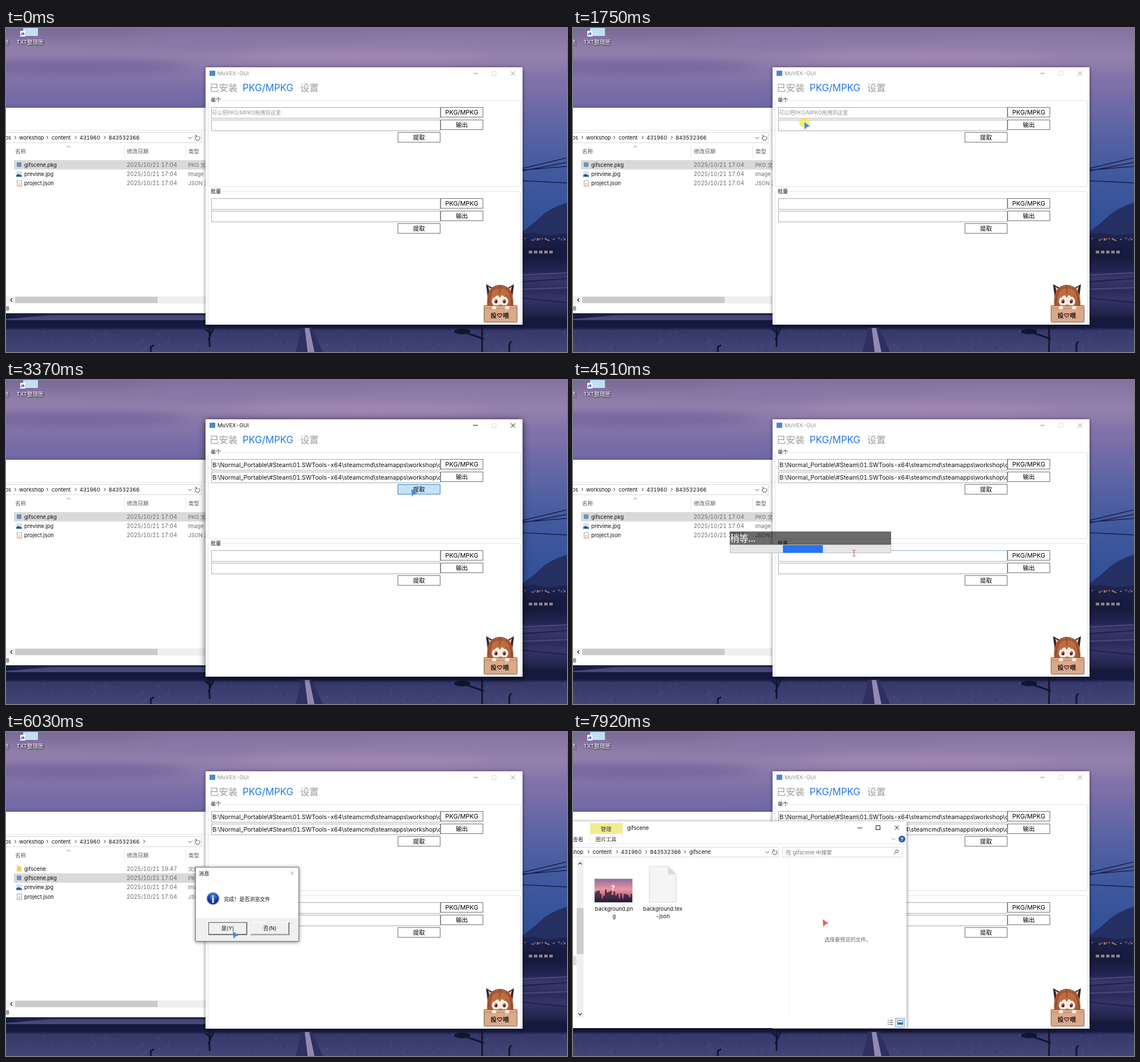
Recreate the animation shown at these times as an HTML page. Size 984x569 px, loop 7990 ms.

```html
<!DOCTYPE html>
<html lang="zh-CN">
<head>
<meta charset="utf-8">
<title>Unpack demo</title>
<style>
html, body { margin: 0; width: 100%; height: 100%; overflow: hidden; background: #1b2048; }
svg { display: block; }
text { font-family: Inter, "Noto Sans CJK SC", "Noto Sans CJK", sans-serif; white-space: pre; font-feature-settings: "tnum"; }
.shadow { filter: drop-shadow(0 1px 3px #0008); }
.line { fill: none; stroke: #444; }
</style>
</head>
<body>
<svg id="stage" width="984" height="569" viewBox="0 0 984 569">
  <defs>
    <linearGradient id="sky" x2="0" y2="1">
      <stop stop-color="#8170a0"/><stop offset=".13" stop-color="#9581ad"/><stop offset=".3" stop-color="#796da8"/>
      <stop offset=".5" stop-color="#5863a3"/><stop offset=".68" stop-color="#42599f"/><stop offset="1" stop-color="#2d4e95"/>
    </linearGradient>
    <linearGradient id="land" x2="0" y2="1">
      <stop stop-color="#1a1f48"/><stop offset=".16" stop-color="#161a3e"/><stop offset=".28" stop-color="#22254f"/>
      <stop offset=".35" stop-color="#39396b"/><stop offset=".46" stop-color="#2a2b5b"/><stop offset=".53" stop-color="#353566"/>
      <stop offset=".65" stop-color="#23264f"/><stop offset=".71" stop-color="#141a3d"/><stop offset=".785" stop-color="#151b40"/>
      <stop offset=".81" stop-color="#363869"/><stop offset="1" stop-color="#434577"/>
    </linearGradient>
    <linearGradient id="dusk" x2="0" y2="1">
      <stop stop-color="#8d6fa3"/><stop offset=".45" stop-color="#ee93a0"/><stop offset=".7" stop-color="#c66f88"/><stop offset="1" stop-color="#221c38"/>
    </linearGradient>
    <radialGradient id="info" cy=".3"><stop stop-color="#4f8df0"/><stop offset="1" stop-color="#0b2f9e"/></radialGradient>
    <filter id="soft" x="-50%" y="-100%" width="200%" height="300%"><feGaussianBlur stdDeviation="24 8"/></filter>
    <clipPath id="field"><rect x="361" y="139" width="400" height="42"/></clipPath>
  </defs>
</svg>
<script>
const LOOP = 7990, RED = [250, 82, 88], BLUE = [70, 135, 245];
const PATH = 'B:\\Normal_Portable\\#Steam\\01.SWTools-x64\\steamcmd\\steamapps\\workshop\\content\\431960\\843532366';
let seed = 7;
const rnd = () => (seed = seed * 16807 % 2147483647) / 2147483647;
const many = (n, f) => Array.from({ length: n }, (_, i) => f(i)).join('');

const text = (x, y, s, size = 9.4, fill = '#111', more = '') =>
  `<text x="${x}" y="${y}" font-size="${size}" fill="${fill}" ${more}>${s}</text>`;
const mid = 'text-anchor="middle"';
const rect = (x, y, w, h, fill, stroke, more = '') => stroke
  ? `<rect x="${x + .5}" y="${y + .5}" width="${w - 1}" height="${h - 1}" fill="${fill}" stroke="${stroke}" ${more}/>`
  : `<rect x="${x}" y="${y}" width="${w}" height="${h}" fill="${fill}" ${more}/>`;
const line = (d, stroke = '#444', w = 1, more = '') =>
  `<path d="${d}" class="line" style="stroke:${stroke};stroke-width:${w}" ${more}/>`;
const shape = (d, fill) => `<path d="${d}" fill="${fill}"/>`;
const group = (id, body, more = '') => `<g id="${id}" ${more}>${body}</g>`;
const oval = (x, y, rx, ry, fill) => `<ellipse cx="${x}" cy="${y}" rx="${rx}" ry="${ry}" fill="${fill}"/>`;

function wallpaper() {
  const clouds = [[110, 68, 210, 14, '#6d5f96'], [120, 122, 200, 14, '#786ba5'], [300, 30, 160, 11, '#8777a5'],
    [620, 50, 230, 10, '#a68bb0'], [810, 18, 190, 12, '#8d7ba8'], [960, 100, 80, 14, '#7f71a8'], [80, 6, 180, 8, '#74668f']];
  return rect(0, 0, 984, 372, 'url(#sky)')
    + `<g filter="url(#soft)" opacity=".7">${clouds.map(c => oval(...c)).join('')}</g>`
    + shape('M900 362 Q925 344 945 325 Q965 312 984 307 V374 H900Z', '#252f62')
    + shape('M900 364 L925 359 950 364 984 361 V376 H900Z', '#1c2450')
    + line('M900 248 L984 228 M900 252 L984 236 M900 250 L984 243 M900 268 L984 272', '#191f49', 1.3)
    + rect(0, 370, 984, 199, 'url(#land)')
    + many(26, () => rect(905 + rnd() * 79, 368 + rnd() * 5, 1 + rnd() * 2, 1.2, '#d39a72'))
    + rect(900, 387, 65, 15, '#151a3b') + many(5, i => rect(917 + i * 9, 391, 6, 5, '#8d8185'))
    + line('M900 434 L984 430 M900 459 L984 456', '#4b4a7d', 2) + line('M900 446 L984 440 M900 474 L984 482', '#1f234d', 2.5)
    + shape('M0 511 L90 503 H350 V513 H0Z', '#4a477c') + shape('M0 505 L60 502 H350 V504 H100Z', '#2b2d5e')
    + many(190, () => { const x = rnd() * 984, y = 530 + rnd() * 39; return line(`M${x} ${y} v${2 + rnd() * 3}`, rnd() < .5 ? '#50527f' : '#2d305f', 1); })
    + shape('M508 569 L518 526 H536 L556 569Z', '#2d3060') + shape('M524 527 H532 L541 569 H529Z', '#9489b4')
    + line('M357 522 V560 M349 528 L360 538 M364 526 L355 548 M254 569 v-9 l6 -3 M883 569 v-14 l3 -5 M835 524 V569', '#12142f', 3)
    + oval(800, 533, 14, 5, '#12142f') + line('M806 535 L838 546', '#12142f', 3)
    + rect(30, -8, 26, 22, '#bfe0f3') + rect(25, 5, 9, 10, '#fff') + line('M27 13 v-3 h4 M29 7.5 l3 2.5 -3 2.5', '#246bc0', 1.3)
    + `<g style="filter:drop-shadow(1px 1px 1px #000)">${text(18.5, 27.5, 'TXT整理匣', 9.6, '#fff')}${text(-5, 27.5, '络', 9.6, '#fff')}</g>`;
}

const icons = {
  pkg: y => rect(19, y - 4, 8, 8, '#6f8fb5'),
  jpg: y => rect(18, y - 5, 10, 10, '#cfe4f5') + shape(`M18 ${y + 5} v-3 l4 -2 6 3 v2z`, '#24599b'),
  json: y => rect(19, y - 5, 9, 11, '#fff', '#b99c88') + text(23.5, y + 3, '{}', 6, '#b06a30', mid),
  dir: y => shape(`M19 ${y - 5} h3 l1 1 h4 v9 h-8z`, '#f7cf68')
};
const FILES = {
  pkg: ['gifscene.pkg', '17:04', 'PKG 文件'], jpg: ['preview.jpg', '17:04', 'Image'],
  json: ['project.json', '17:04', 'JSON 源文件'], dir: ['gifscene', '19:47', '文件夹']
};
const fileList = (id, order) => group(id, order.map((key, i) => {
  const y = 240 + i * 16.3, [name, time, type] = FILES[key];
  return (key == 'pkg' ? rect(14, y - 8, 340, 16.5, '#d9d9d9', '', 'class="pick"') : '') + icons[key](y)
    + text(32, y + 3.6, name, 9.4) + text(211.5, y + 3.6, '2025/10/21 ' + time, 9.8, '#6d6d6d') + text(319.5, y + 3.6, type, 9.4, '#6d6d6d');
}).join(''));

const crumbs = (y, items) => items.map(([x, s]) => text(x, y, s, s == '›' ? 12 : 9.3, s == '›' ? '#555' : '#111')).join('');
const refresh = (x, y) => line(`M${x + 2} ${y - 3} A4 4 0 1 1 ${x - 2} ${y - 3} M${x - 4} ${y - 4} h3 v3`);
const chevron = (x, y, c) => line(`M${x - 3} ${y - 1.5} l3 3 3 -3`, c);

function explorer() {
  return rect(-9, 140, 370, 361, '#fff', '', 'class="shadow"') + rect(0, 179, 350, 1, '#e6e6e6')
    + rect(-5, 183, 348, 19, '#fff', '#d9d9d9') + line('M331 184 v17', '#e2e2e2')
    + crumbs(195.6, [[-1.5, 'os'], [14, '›'], [23, 'workshop'], [70, '›'], [80, 'content'], [120, '›'], [129, '431960'], [171, '›'], [180, '843532366']])
    + chevron(323, 193) + refresh(336, 193)
    + text(16, 220.4, '名称', 9.5, '#555') + text(212, 220.4, '修改日期', 9.5, '#555') + text(320, 220.4, '类型', 9.5, '#555')
    + line('M106.5 210 l3 -3 3 3', '#777') + line('M207.5 206 v22 M315.5 206 v22', '#e5e5e5')
    + fileList('before', ['pkg', 'jpg', 'json']) + fileList('added', ['pkg', 'jpg', 'json', 'dir']) + fileList('sorted', ['dir', 'pkg', 'jpg', 'json'])
    + group('tail', text(240, 195.6, '›', 12, '#555'))
    + rect(0, 471, 350, 13, '#f0f0f0') + rect(16, 472, 250, 11, '#cbcbcb') + line('M11 474.5 l-3 3 3 3', '#333', 1.3)
    + text(-2, 495.5, 'IB', 8.6);
}

const button = (x, y, s, size = 10.4, id = '') => rect(x, y, 75, 18, '#fff', '#707070', id && `id="${id}"`) + text(x + 37.5, y + 13, s, size, '#000', mid);
const field = (y, id) => rect(360, y, 402, 20, '#fff', '#a9a9a9', `id="${id}"`);

function mascot() {
  return shape('M845 474 L842 450 L857 458 H877 L891 450 L888 474Z', '#33272a')
    + shape('M848 463 l-2 -9 8 6z M885 463 l2 -9 -8 6z', '#efc4b8')
    + shape('M844 491 Q841 452 866 451 Q892 452 890 491Z', '#a95c35')
    + oval(866.5, 480, 14.5, 11, '#fdeadd')
    + shape('M850 480 Q849 457 867 458 Q885 457 884 480 Q882 472 878 468 L875 473 870 468 866 474 862 468 857 473 Q851 473 850 480Z', '#bd6d42')
    + line('M847 489 Q845 465 858 456 M887 489 Q888 465 876 456 M866 452 V467', '#7d3d22')
    + oval(859.5, 480, 2.6, 3.6, '#4a2019') + oval(874, 480, 2.6, 3.6, '#4a2019') + oval(859, 478.5, 1, 1, '#fff') + oval(873.5, 478.5, 1, 1, '#fff')
    + line('M864.5 486 q2.5 2 5 0', '#8d443b')
    + rect(838, 487, 59, 30, '#d9a98a', '#8b5a46', 'rx="1"') + line('M838 492.5 h59', '#b98465')
    + oval(856, 491, 4, 3, '#fdeadd') + oval(879, 491, 4, 3, '#fdeadd')
    + text(866, 509, '投♡喂', 10.6, '#241712', mid + ' font-weight="600"');
}

function tool() {
  const frame = (y, h, s) => rect(354, y, 549, h, 'none', '#e3e3e3', 'rx="2"') + rect(357, y - 4, 22, 10, '#fff') + text(359, y + 2.8, s, 9);
  return rect(350, 69, 556, 452, '#fff', '', 'id="frame" class="shadow"')
    + rect(357, 75, 10, 9, '#4a86d8')
    + group('title', text(371, 83.3, 'MuVEX-GUI', 9.4, 'inherit') + line('M819.5 79.5 h8 M885.5 76 l7.5 7.5 M893 76 l-7.5 7.5', 'currentColor'))
    + rect(852, 76, 8, 8, 'none', '#dedede')
    + text(357, 111, '已安装', 16.4, '#9b9b9b') + text(415, 111, 'PKG/MPKG', 16.8, '#2277e6') + text(516, 111, '设置', 16.3, '#9b9b9b')
    + frame(127, 152, '单个') + frame(287, 232, '批量')
    + field(139) + field(161) + field(299, 'batch') + field(321)
    + group('hint', text(361, 152, '可以把PKG/MPKG拖拽到这里', 9.1, '#949494'))
    + group('paths', `<g clip-path="url(#field)">${text(362, 152.5, PATH + '\\gifscene.pkg', 10.5)}${text(362, 174.5, PATH + '\\gifscene', 10.5)}</g>`)
    + button(762, 139, 'PKG/MPKG', 10.9) + button(762, 161, '输出') + button(687, 183, '提取', 10.4, 'extract')
    + button(762, 299, 'PKG/MPKG', 10.9) + button(762, 321, '输出') + button(687, 343, '提取') + mascot();
}

const popup = () => rect(275, 266, 283, 24, '#000', '', 'opacity=".58"') + text(275.5, 284, '稍等...', 16, '#fff', 'font-weight="500"')
  + rect(275, 289, 283, 15, '#e6e6e6', '#bcbcbc') + rect(0, 290, 70, 13.5, '#2874f0', '', 'id="bar"');

function dialog() {
  const choice = (x, s) => rect(x, 334, 68, 22, '#f0f0f0') + line(`M${x} 334.5 h67`, '#fff')
    + line(`M${x} 356 h67.5 V334`, '#606060', 1.2) + line(`M${x + 1} 355 h65.5 V335`, '#a5a5a5') + text(x + 34, 348.3, s, 9.2, '#111', mid);
  return rect(332, 237, 182, 131, '#fff', '#777', 'class="shadow"') + rect(333, 327, 180, 40, '#f0f0f0')
    + text(338, 251.5, '消息', 9.3) + line('M499 245 l6 6 M505 245 l-6 6', '#aaa')
    + '<circle cx="363" cy="292.5" r="10.7" fill="url(#info)" stroke="#a9adb8" stroke-width="1.3"/>'
    + text(363, 299.5, 'i', 18, '#fff', mid + ' font-weight="700" style="font-family:\'Liberation Serif\',serif"')
    + text(382, 296.7, '完成！是否浏览文件', 9.05)
    + choice(355, '是(Y)') + choice(429, '否(N)') + rect(355, 334, 68, 22, 'none', '#555');
}

function results() {
  const skyline = many(22, i => { const h = 6 + rnd() * 17; return rect(38 + i * 3, 299 - h, 3, h, '#241d36', '', 'opacity=".75"'); });
  return rect(-9, 157, 594, 363, '#fff', '', 'class="shadow"')
    + rect(30, 160, 57, 19, '#f1ec8d') + line('M30 179 v16 M87 179 v16 M0 196.5 h585', '#e8e8e8')
    + text(58, 173.5, '管理', 9.3, '#333', mid) + text(58, 191.5, '图片工具', 9.1, '#333', mid) + text(0, 191.5, '查看', 9.1, '#333')
    + text(95, 171.7, 'gifscene', 9.4) + line('M499 168.5 h8 M564.5 164.5 l7 7 M571.5 164.5 l-7 7', '#222') + rect(531, 164, 8, 8, 'none', '#222')
    + chevron(562, 188, '#888') + oval(577, 188, 6, 6, '#315f9e') + text(577, 191.5, '?', 9, '#fff', mid + ' font-weight="700"')
    + rect(-5, 202, 366, 18, '#fff', '#d9d9d9') + rect(367, 202, 211, 18, '#fff', '#d9d9d9')
    + crumbs(214, [[-3.5, 'shop'], [25, '›'], [34.5, 'content'], [75, '›'], [84, '431960'], [126, '›'], [135, '843532366'], [194, '›'], [204, 'gifscene']])
    + chevron(341, 211) + refresh(354, 211) + text(373.5, 214.5, '在 gifscene 中搜索', 9.4, '#777')
    + '<circle cx="568" cy="209.5" r="2.5" class="line"/>' + line('M566 211.5 l-3.5 3.5')
    + rect(6.5, 224, 12, 278, '#f0f0f0') + rect(6.5, 309, 12, 81, '#cdcdcd') + rect(0, 393, 6, 17, '#dedede')
    + line('M9.5 232.5 l3 -3 3 3 M9.5 494 l3 3 3 -3', '#333', 1.3) + line('M378.5 224 V502', '#f3f3f3')
    + rect(37, 257, 68, 43, '#e0e0e0') + rect(38, 258, 66, 41, 'url(#dusk)') + skyline + text(70, 278, '?', 12, '#fff', mid + ' font-weight="700"')
    + shape('M134 236 h33 l14 14 v49 h-47z', '#f5f5f5') + line('M134 236 h33 l14 14 v48.5 h-47z', '#d4d4d4') + shape('M167 236 v14 h14z', '#d9d9d9')
    + text(72, 313.5, 'background.pn', 9.4, '#111', mid) + text(72, 326.5, 'g', 9.4, '#111', mid)
    + text(157.5, 313.5, 'background.tex', 9.4, '#111', mid) + text(157.5, 326.5, '-json', 9.4, '#111', mid)
    + text(441, 367.5, '选择要预览的文件。', 9.1, '#666')
    + line('M552 506.5 h2 M552 510 h2 M552 513.5 h2 M555.5 506.5 h6 M555.5 510 h6 M555.5 513.5 h6', '#777', 1.5)
    + rect(565, 502, 17, 17, '#cde8fb', '#75b8e6') + rect(569, 506, 10, 8, '#fff', '#777') + rect(570, 510, 8, 3, '#2e6f94');
}

const drag = () => rect(-48, -65, 79, 78, '#cfe8f4', '#b5d6e6', 'opacity=".6"') + rect(-30, -46, 40, 40, '#2f9fe8', '', 'rx="3"');
const pointer = () => group('halo', oval(0, 1, 9, 9, '#f1e94a'), 'opacity=".75"')
  + '<path id="arrow" d="M0 0 L10 7 4.5 9 1 13.5Z"/>'
  + group('beam', line('M-2 -5 h5 M-2 5 h5 M.5 -5 v10', '#d9464c'));

const stage = document.getElementById('stage');
stage.insertAdjacentHTML('beforeend', wallpaper() + explorer() + tool() + group('popup', popup()) + group('dialog', dialog())
  + group('results', results()) + group('drag', drag()) + group('pointer', pointer()));

const el = id => document.getElementById(id);
const show = (id, on) => el(id).style.display = on ? '' : 'none';
const ramp = (t, a, b) => Math.max(0, Math.min(1, (t - a) / (b - a)));
const between = (t, a, b) => t >= a && t < b;

// time, x, y of the pointer tip
const KEYS = [[130, 584, 473], [500, 380, 345], [880, 185, 243], [1140, 200, 244], [1280, 247, 234], [1480, 325, 203], [1890, 447, 146],
  [2380, 447, 146], [2570, 616.5, 214], [2890, 711, 191.5], [3480, 711, 191.5], [3900, 545, 292], [4150, 492.5, 304],
  [5370, 492.5, 304], [5640, 398, 350], [6650, 398, 350], [7000, 532, 352], [7840, 532, 352], [7920, 438, 329]];
function place(t) {
  const i = KEYS.findIndex(k => k[0] > t);
  if (i < 0) return KEYS[KEYS.length - 1].slice(1);
  if (!i) return KEYS[0].slice(1);
  const [a, x, y] = KEYS[i - 1], [b, u, v] = KEYS[i], p = ramp(t, a, b);
  return [x + (u - x) * p, y + (v - y) * p];
}

function grow(id, t, start, end, cx, cy) {
  const p = ramp(t, start, end), s = .93 + .07 * p;
  el(id).style.opacity = p;
  el(id).setAttribute('transform', `translate(${cx * (1 - s)} ${cy * (1 - s)}) scale(${s})`);
}

function draw(t) {
  const [x, y] = place(t);
  const dragging = between(t, 1140, 2090), typing = between(t, 3950, 4870);
  const active = between(t, 3090, 3560) || between(t, 4790, 4930) || between(t, 6440, 6900);

  show('before', t < 4600);
  show('added', between(t, 4600, 4790));
  show('sorted', t >= 4790);
  show('tail', t >= 4790);
  document.querySelectorAll('.pick').forEach(r => r.setAttribute('fill', between(t, 800, 1140) ? '#cce8ff' : '#d9d9d9'));

  const ink = active ? '#111' : '#8f8f8f';
  el('title').setAttribute('style', `color:${ink};fill:${ink}`);
  el('frame').style.filter = active ? 'drop-shadow(0 2px 6px #000b)' : '';
  show('hint', t < 2380);
  show('paths', t >= 2380);
  const hover = between(t, 2780, 3600);
  el('extract').setAttribute('fill', hover ? '#c4e3f8' : '#fff');
  el('extract').setAttribute('stroke', hover ? '#3d7fb0' : '#707070');
  el('batch').setAttribute('stroke', typing ? '#7eb4ea' : '#a9a9a9');

  show('popup', between(t, 3560, 4790));
  const left = 206 + (162 + (t - 4510) * .22 + 352) % 352, a = Math.max(276, left), b = Math.min(557, left + 70);
  el('bar').setAttribute('x', a);
  el('bar').setAttribute('width', Math.max(0, b - a));

  show('dialog', between(t, 4930, 6510));
  grow('dialog', t, 4930, 5170, 423, 302);
  if (t > 6440) el('dialog').style.opacity = 1 - ramp(t, 6440, 6510);
  show('results', t >= 7410);
  grow('results', t, 7350, 7600, 290, 338);

  const at = `translate(${x} ${y})`;
  el('drag').setAttribute('transform', at);
  el('pointer').setAttribute('transform', at);
  show('drag', dragging && x < 350);
  show('halo', dragging);
  show('pointer', t >= 130);
  show('arrow', !typing);
  show('beam', typing);
  const press = dragging ? 1 : t < 5000 ? ramp(t, 3090, 3250) * (t < 3560) : ramp(t, 5760, 6030) * (t < 6510);
  el('arrow').setAttribute('fill', `rgb(${RED.map((c, i) => Math.round(c + (BLUE[i] - c) * press))})`);
}

const start = performance.now();
function tick() {
  draw((performance.now() - start) % LOOP);
  requestAnimationFrame(tick);
}
tick();
</script>
</body>
</html>
```
